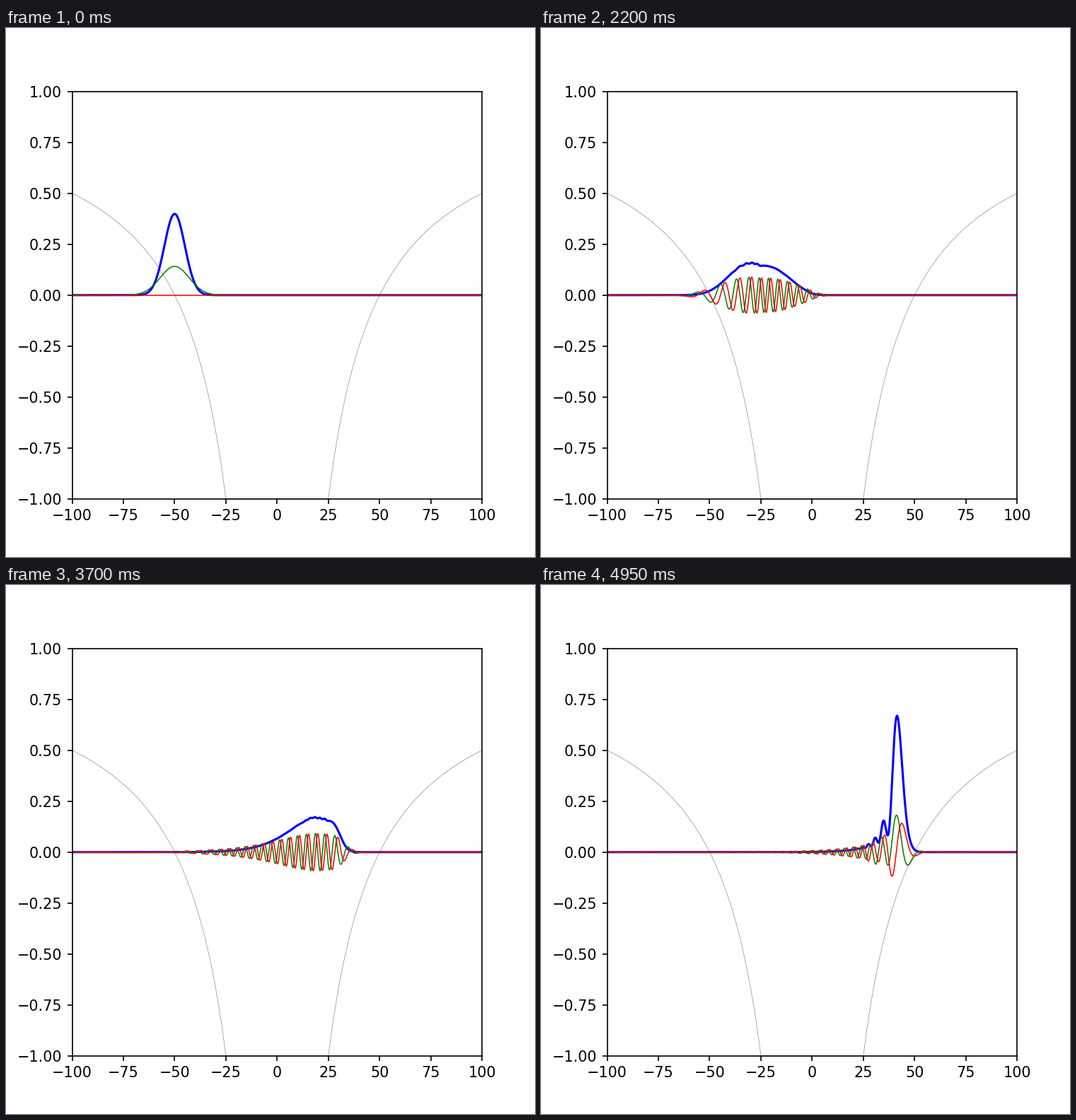
A matplotlib script for the animation above (5000 ms loop, 748 by 748 pixels).

```python
import numpy as np
import matplotlib.pyplot as plt
from matplotlib.animation import FuncAnimation

FRAMES = 100
INTERVAL = 50     # ms per frame
SUBSTEPS = 20     # integration steps per frame (one time unit)
SIGMA = 5.0       # initial width of the packet
START = -50.0     # initial centre of the packet

x = np.linspace(-100, 100, 1001)
dx = x[1] - x[0]
k = 2 * np.pi * np.fft.fftfreq(x.size, dx)

# Coulomb-like well with a flat floor at -1
potential = 1 - 50 / np.maximum(np.abs(x), 25)


def evolve():
    """Split-step solution of the Schroedinger equation, one row per frame."""
    dt = 1 / SUBSTEPS
    half_kick = np.exp(-0.5j * potential * dt)
    drift = np.exp(-0.5j * k**2 * dt)
    psi = np.exp(-((x - START) / (2 * SIGMA)) ** 2).astype(complex)
    psi /= np.sqrt(np.sum(np.abs(psi) ** 2) * dx)
    states = [psi]
    for _ in range(FRAMES - 1):
        for _ in range(SUBSTEPS):
            psi = half_kick * np.fft.ifft(drift * np.fft.fft(half_kick * psi))
        states.append(psi)
    return states


states = evolve()

fig, ax = plt.subplots(figsize=(5, 5), dpi=149.6)
ax.set_xlim(-100, 100)
ax.set_ylim(-1, 1)
ax.set_xticks(np.arange(-100, 101, 25))
ax.set_yticks(np.arange(-1, 1.01, 0.25))

ax.plot(x, potential, color="gray", lw=0.3)
density, = ax.plot([], [], color="b", lw=1.5)
real, = ax.plot([], [], color="g", lw=0.75)
imag, = ax.plot([], [], color="r", lw=0.75)


def draw(frame):
    psi = states[frame]
    density.set_data(x, 5 * np.abs(psi) ** 2)
    real.set_data(x, psi.real / 2)
    imag.set_data(x, psi.imag / 2)
    return density, real, imag


anim = FuncAnimation(fig, draw, frames=FRAMES, interval=INTERVAL,
                     repeat=True, repeat_delay=0)
plt.show()
```
